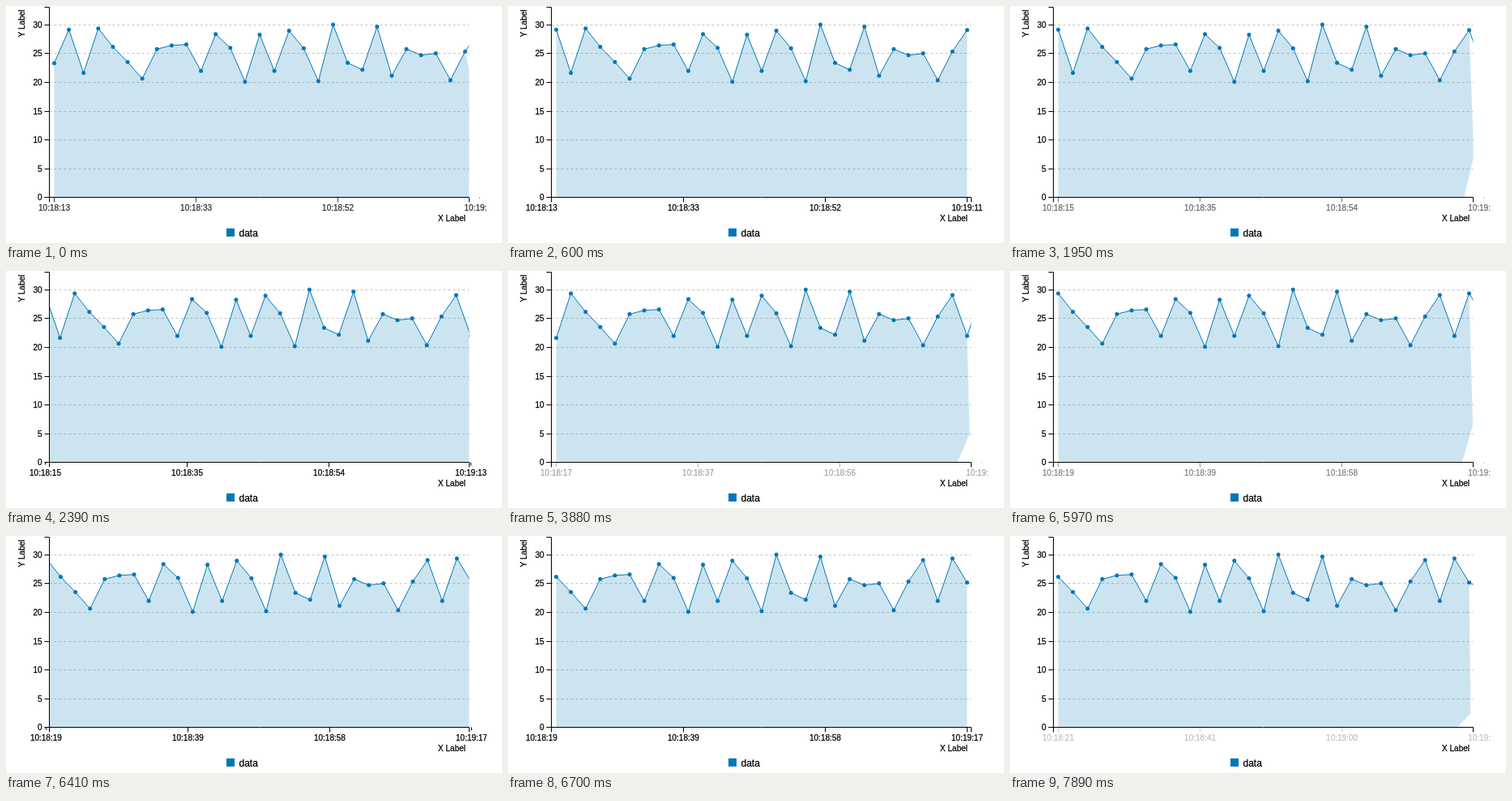
These frames come from a looping animation (612x293 px, 8 s). An HTML page with a canvas:

```html
<!DOCTYPE html>
<html lang="en">
<head>
<meta charset="utf-8">
<title>Streaming area chart</title>
<style>
  html, body { margin: 0; width: 100%; height: 100%; overflow: hidden; background: #fff; }
  canvas { display: block; }
</style>
</head>
<body>
<canvas id="chart" width="612" height="293"></canvas>
<script>
const ctx = document.getElementById('chart').getContext('2d');
const BLUE = '#0077b6';
const LEFT = 53.5, RIGHT = 571.5, AXIS_Y = 236.5;
const ZERO = 236.55, UNIT = 7.103;
const FIRST = 59.5, STEP = 507 / 28, COUNT = 29;
const LOOP = 8000, PHASE = 375, TICK = 6;

const values = [
  23.35, 29.2, 21.65, 29.4, 26.2, 23.55, 20.65, 25.8, 26.45, 26.6, 22, 28.4,
  26, 20.1, 28.3, 22, 29, 25.95, 20.2, 30.05, 23.4, 22.2, 29.7, 21.15, 25.8,
  24.75, 25.05, 20.4, 25.4, 29.1, 22, 29.4, 25.2, 23.8
];
// Each update first morphs in a new point, then scrolls one step left.
const updates = [
  { morph: -203, flow: 172 }, { morph: 1788, flow: 2163 }, { morph: 3751, flow: 4205 },
  { morph: 5821, flow: 6201 }, { morph: 7780, flow: 8200 }
];

const px = i => FIRST + i * STEP;
const py = v => ZERO - v * UNIT;
const clamp = v => Math.min(1, Math.max(0, v));
const cubicInOut = t => t < .5 ? 4 * t ** 3 : 1 - 4 * (1 - t) ** 3;
const snap = v => Math.floor(v) + .5;

function trace(points) {
  ctx.beginPath();
  points.forEach(([x, y]) => ctx.lineTo(x, y));
}

function stroke(color, ...points) {
  ctx.strokeStyle = color;
  trace(points);
  ctx.stroke();
}

// A hairline outline gives the lettering slightly more weight.
function text(label, x, y, align, size = 10) {
  ctx.save();
  ctx.font = `${size}px "Liberation Sans", Arial, sans-serif`;
  ctx.textAlign = align;
  ctx.fillStyle = ctx.strokeStyle = '#000';
  ctx.lineWidth = .25;
  ctx.fillText(label, x, y);
  ctx.strokeText(label, x, y);
  ctx.restore();
}

function clock(seconds) {
  const pad = n => String(n).padStart(2, '0');
  return `10:${pad(18 + Math.floor(seconds / 60))}:${pad(seconds % 60)}`;
}

function drawGrid() {
  ctx.setLineDash([3, 3]);
  for (let v = 5; v <= 30; v += 5) stroke('#c4c4c4', [LEFT, snap(py(v))], [RIGHT, snap(py(v))]);
  ctx.setLineDash([]);
}

function drawSeries(offset, extra, morph, shift) {
  const points = values.slice(offset, offset + COUNT + extra).map((v, i) => [px(i), py(v)]);
  const area = points.slice(0, COUNT);
  if (extra) {
    const newY = points[COUNT][1];
    area.push([px(COUNT - 1 + morph), ZERO + (newY - ZERO) * morph]);
    area.push([px(COUNT - 2 + 2 * morph), ZERO]);
  } else {
    area.push([px(COUNT - 1), ZERO]);
  }
  area.push([FIRST, ZERO]);

  ctx.save();
  ctx.beginPath();
  ctx.rect(LEFT, 0, RIGHT - LEFT, 237);
  ctx.clip();
  ctx.translate(-shift, 0);
  ctx.fillStyle = BLUE;
  ctx.globalAlpha = .2;
  trace(area);
  ctx.fill();
  ctx.globalAlpha = 1;
  stroke(BLUE, ...points);
  for (const [x, y] of points) {
    ctx.beginPath();
    ctx.arc(x, y, 2.5, 0, 2 * Math.PI);
    ctx.fill();
  }
  ctx.restore();
}

// Tick marks grow or shrink while they scroll across the ends of the axis.
function drawTimeTicks(start, progress, opacity) {
  const length = x => x > LEFT && x < RIGHT ? TICK : 1;
  ctx.save();
  ctx.beginPath();
  ctx.rect(20, 230, 573, 30);
  ctx.clip();
  ctx.globalAlpha = opacity;
  [0, 20, 39, 58].forEach((seconds, k) => {
    const from = px(k * COUNT / 3), to = from - STEP;
    const x = from - STEP * progress;
    const size = length(from) + (length(to) - length(from)) * progress;
    stroke('#000', [snap(x), AXIS_Y], [snap(x), AXIS_Y + size]);
    text(clock(start + seconds), x, 252.6, 'center');
  });
  ctx.restore();
}

function drawFrame() {
  stroke('#000', [LEFT - TICK, 1.5], [LEFT, 1.5], [LEFT, AXIS_Y], [LEFT - TICK, AXIS_Y]);
  stroke('#000', [LEFT, AXIS_Y + TICK], [LEFT, AXIS_Y], [RIGHT, AXIS_Y], [RIGHT, AXIS_Y + TICK]);
  for (let v = 0; v <= 30; v += 5) {
    const y = snap(py(v));
    stroke('#000', [LEFT - TICK, y], [LEFT, y]);
    text(v, LEFT - 9, y + 3.2, 'right');
  }
  text('X Label', 567, 266, 'right');
  ctx.save();
  ctx.translate(22.7, 4.5);
  ctx.rotate(-Math.PI / 2);
  text('Y Label', 0, 0, 'right');
  ctx.restore();
  ctx.fillStyle = BLUE;
  ctx.fillRect(272, 275, 10, 10);
  text('data', 287.5, 285, 'left', 12);
}

function render(now) {
  const t = now % LOOP;
  const index = updates.findLastIndex(u => u.morph <= t);
  const { morph, flow } = updates[index];
  const ease = lead => cubicInOut(clamp((t - morph + lead) / PHASE));
  const progress = clamp((t - flow) / PHASE);

  ctx.fillStyle = '#fff';
  ctx.fillRect(0, 0, 612, 293);
  ctx.lineWidth = 1;
  drawGrid();
  if (progress === 1) drawSeries(index + 1, 0, 0, 0);
  else drawSeries(index, 1, ease(0), progress * STEP);
  drawTimeTicks(13 + 2 * index, progress, ease(28));
  drawFrame();
  requestAnimationFrame(render);
}
render(0);
</script>
</body>
</html>
```
